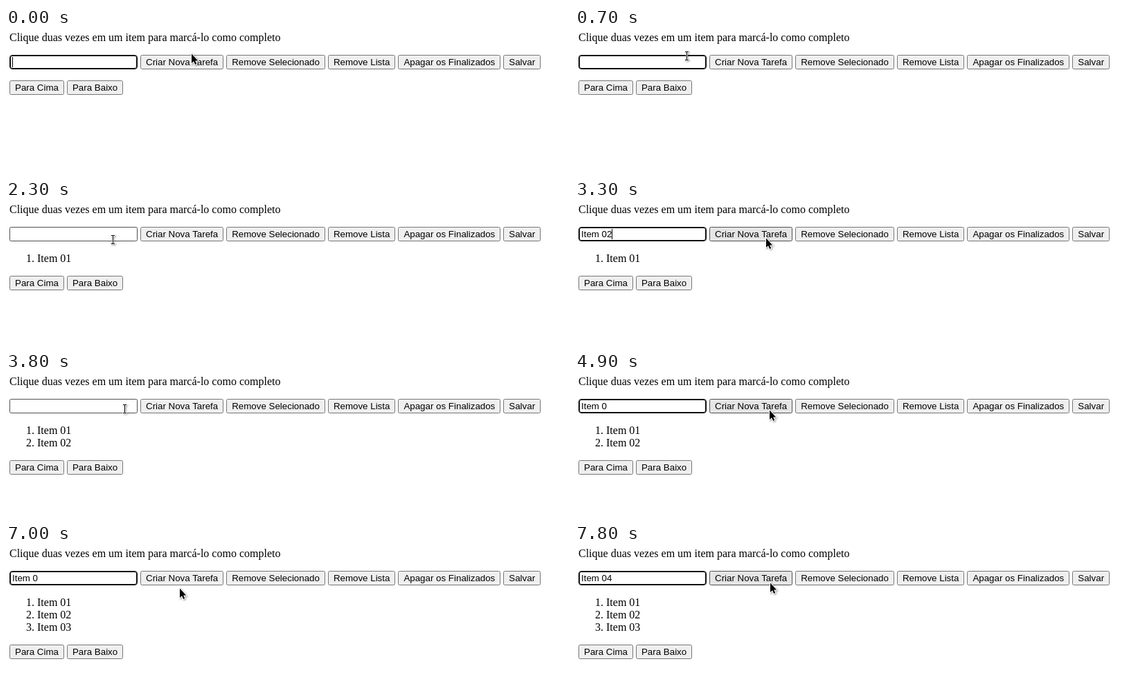
Animation, 813 px wide and 209 px high, one loop 8000 ms. Source, as an HTML page:

```html
<!DOCTYPE html>
<html lang="pt">
<head>
<meta charset="utf-8">
<style>
  html, body { margin: 0; width: 813px; height: 209px; overflow: hidden; background: #fff; }
  body { position: relative; color: #000; font: 16px/18px "Liberation Serif", serif; }
  main { padding: 5px; }
  p, ol { margin: 0 0 16px; }
  ol { padding-left: 40px; }
  .row { display: flex; gap: 4px; margin-bottom: 16px; }
  .row > * {
    flex: none; box-sizing: border-box; height: 21px; margin: 0; padding: 2px 7px;
    border: 1px solid #767676; border-radius: 2.5px; background: #efefef; color: #000;
    font: 13.3333px/15px "Liberation Sans", sans-serif; white-space: pre;
  }
  .row > #field { width: 185px; padding: 2px 3px; background: #fff; }
  .row > #create.hover { background: #e5e5e5; }
  .row > .hover { border-color: #4f4f4f; }
  .row > #field.focus { border-color: #101010; border-radius: 4px; box-shadow: inset 0 0 0 1px #101010; }
  #caret { display: inline-block; width: 1px; height: 15px; margin-left: -.4px; background: #000; vertical-align: top; }
  svg { position: absolute; left: 0; top: 0; overflow: visible; filter: drop-shadow(1px 1px 1px #0006); }
  path { stroke: #fff; paint-order: stroke; }
</style>
</head>
<body>
<main>
  <p>Clique duas vezes em um item para marcá-lo como completo</p>
  <div class="row"><div id="field"><span id="typed"></span><span id="caret"></span></div><button id="create">Criar Nova Tarefa</button><button>Remove Selecionado</button><button>Remove Lista</button><button>Apagar os Finalizados</button><button>Salvar</button></div>
  <ol id="list"><li>Item 01</li><li>Item 02</li><li>Item 03</li></ol>
  <div class="row"><button>Para Cima</button><button>Para Baixo</button></div>
</main>
<svg id="cursor" width="16" height="20">
  <path id="arrow" stroke-width="2" d="M0 1.5V15L3 12.2 5.2 17 7.2 16 5.2 11.5H9.2Z"/>
  <path id="beam" stroke-width="1.5" d="M-2-7H0L.5-6.5 1-7H3V-6H1V5H3V6H1L.5 5.5 0 6H-2V5H0V-6H-2Z"/>
</svg>
<script>
const LOOP = 8000, STEP = 100, BLINK = 500;
const $ = id => document.getElementById(id);

// Each round adds one task: click the field, type the name, type its digit, press the button
const rounds = [
  { focus: 0, name: 900, digit: 1800, press: 2000 },
  { focus: 2500, name: 2800, digit: 3300, press: 3600 },
  { focus: 4000, name: 4400, digit: 5200, press: 5400 },
  { focus: 6200, name: 6400, digit: 7300, press: LOOP }
];

// Straight pointer moves: start, end, x, y
const moves = [
  [0, 100, 271, 36], [200, 400, 262, 50], [400, 1000, 60, 31],
  [1300, 1400, 158, 96], [1400, 1800, 274, 51], [2000, 2300, 154, 58],
  [3100, 3300, 276, 54], [3600, 3800, 171, 54], [4800, 4900, 281, 54],
  [5500, 5800, 160, 64], [5800, 6000, 155, 57], [6500, 7000, 251, 63], [7100, 7600, 282, 55]
];

function pointerAt(t) {
  let x = 268, y = 36;
  for (const [start, end, toX, toY] of moves) {
    const k = Math.min(1, Math.max(0, (t - start) / (end - start)));
    x += (toX - x) * k;
    y += (toY - y) * k;
  }
  return [Math.round(x), Math.round(y)];
}

function formAt(t) {
  const count = rounds.filter(round => t >= round.press).length;
  const { focus, name, digit } = rounds[count];
  const text = t >= digit ? `Item 0${count + 1}` : t >= name ? "Item 0" : "";
  const lastEdit = [digit, name, focus].find(time => t >= time);
  return { count, text, focused: t >= focus, caret: (t - lastEdit) % (2 * BLINK) < BLINK };
}

function draw(now) {
  const t = Math.floor(now % LOOP / STEP) * STEP;
  const [x, y] = pointerAt(t);
  const { count, text, focused, caret } = formAt(t);
  const inRow = y >= 39 && y < 60;
  const beam = x < 190 && y >= 39 && y < 66;

  $("typed").textContent = text;
  $("caret").style.visibility = caret ? "visible" : "hidden";
  $("field").className = focused ? "focus" : inRow && x < 190 ? "hover" : "";
  $("create").className = inRow && x >= 194 && x < 314 ? "hover" : "";
  $("list").hidden = !count;
  [...$("list").children].forEach((item, i) => item.hidden = i >= count);

  $("cursor").style.transform = `translate(${x}px, ${y}px)`;
  $("arrow").style.display = beam ? "none" : "";
  $("beam").style.display = beam ? "" : "none";
  requestAnimationFrame(draw);
}
requestAnimationFrame(draw);
</script>
</body>
</html>
```
